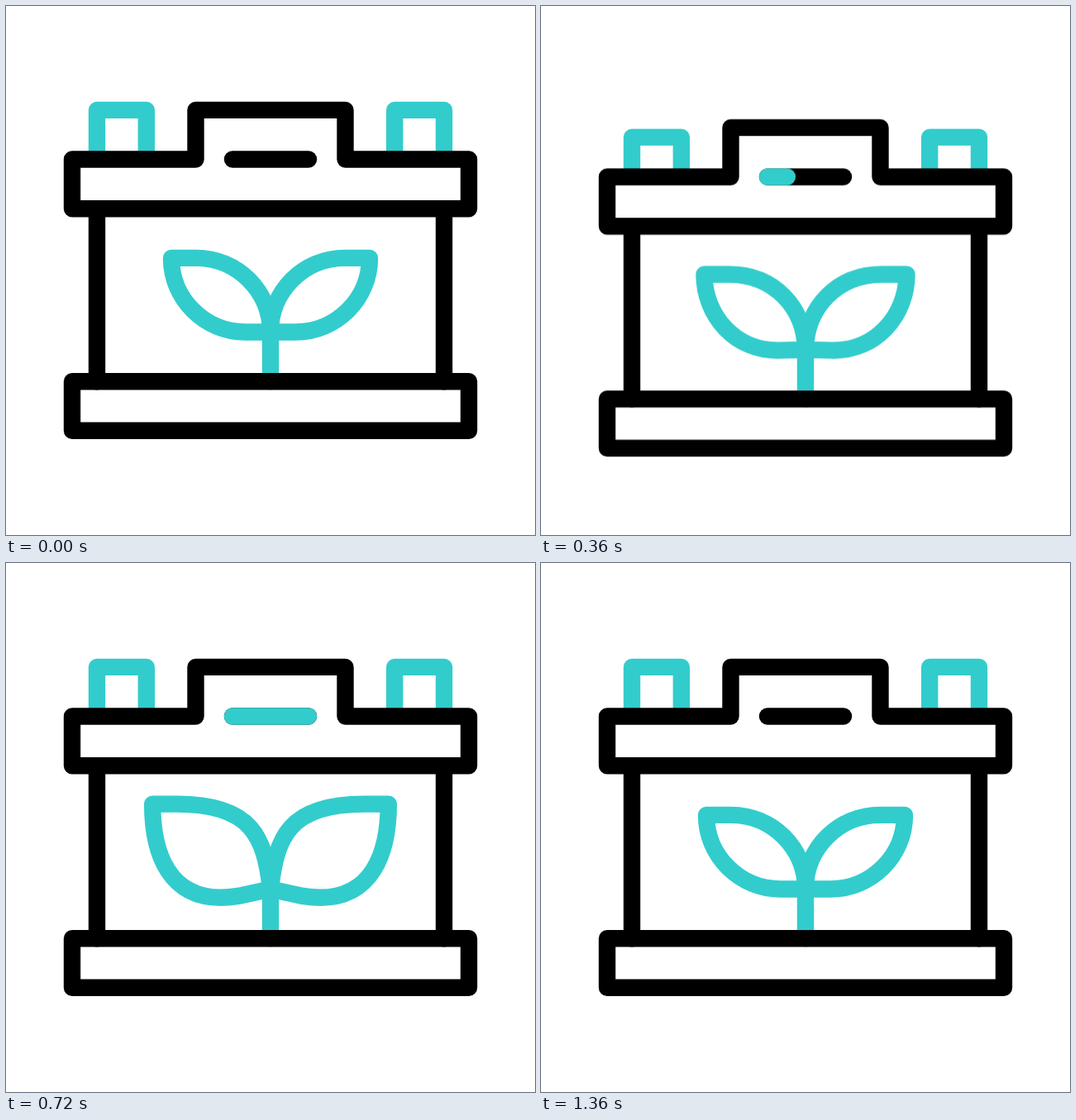
Animation of 640 by 640 pixels, one loop 1480 ms. Source, as an HTML page without scripts:

```html
<!DOCTYPE html>
<html lang="en">
<head>
<meta charset="utf-8">
<title>Eco battery</title>
<style>
  html, body { margin: 0; width: 100%; height: 100%; overflow: hidden; background: #fff; }
  svg { display: block; width: 100%; height: 100%; }

  path { fill: none; stroke: #000; stroke-width: 20.4; stroke-linecap: round; stroke-linejoin: round; }
  .teal { stroke: #3cc; }
  .lid { fill: #fff; }

  .leaf {
    --rest: path("M320 394.5 C320 344.9 279.7 304.9 230 304.9 L200 304.9 C200 354.5 240.3 394.5 290 394.5 Z");
    --over: path("M320 394.5 C312.9 332 298.7 291.2 206.4 291.2 L176.4 291.2 C176.4 341 189.8 418 280.7 403.2 Z");
    --open: path("M320 394.5 C315 335 293 295.3 213.5 295.3 L183.5 295.3 C183.5 345 205 411 283.5 400.6 Z");
    d: var(--rest);
  }
  .charge { stroke-dasharray: 92 200; }

  .body, .posts, .leaf, .charge { animation: 1480ms cubic-bezier(.333, 0, .667, 1) infinite; }
  .body { animation-name: bounce; }
  .posts { animation-name: press; }
  .leaf { animation-name: grow; }
  .charge { animation-name: charge; }

  @keyframes bounce {
    0%, 8.108% { transform: translateY(0); }
    21.622% { transform: translateY(24.6px); }
    35.135% { transform: translateY(-6.4px); }
    48.649%, 100% { transform: translateY(0); }
  }
  /* Relative to the body */
  @keyframes press {
    0%, 5.405% { transform: translateY(0); }
    18.919% { transform: translateY(31.8px); }
    29.73% { transform: translateY(-7.8px); }
    40.541%, 100% { transform: translateY(0); }
  }
  @keyframes grow {
    0%, 18.919%, 91.892%, 100% { d: var(--rest); }
    45.946% { d: var(--over); }
    59.459%, 75.676% { d: var(--open); }
  }
  /* Slightly over the full length, so no round cap shows when empty */
  @keyframes charge {
    0%, 13.514%, 91.892%, 100% { stroke-dashoffset: 92.3px; }
    45.946%, 75.676% { stroke-dashoffset: 0px; }
  }
</style>
</head>
<body>
<svg viewBox="0 0 640 640">
  <g class="body">
    <g class="posts">
      <path class="teal" d="M110 185.5 V125.9 H169.8 V185.5"/>
      <path class="teal" d="M470.2 185.5 V125.9 H530 V185.5"/>
    </g>

    <path class="teal" d="M320 394.5 V454.3"/>
    <path class="teal leaf"/>
    <g transform="matrix(-1 0 0 1 640 0)">
      <path class="teal leaf"/>
    </g>

    <path d="M110 245.2 V454.3 M530 245.2 V454.3"/>
    <path d="M80 454.3 H560 V513.8 H80 Z"/>
    <path class="lid" d="M80 185.5 H229.5 V125.9 H410.5 V185.5 H560 V245.2 H80 Z"/>

    <path d="M274 185.5 H366"/>
    <path class="teal charge" d="M274 185.5 H366"/>
  </g>
</svg>
</body>
</html>
```
